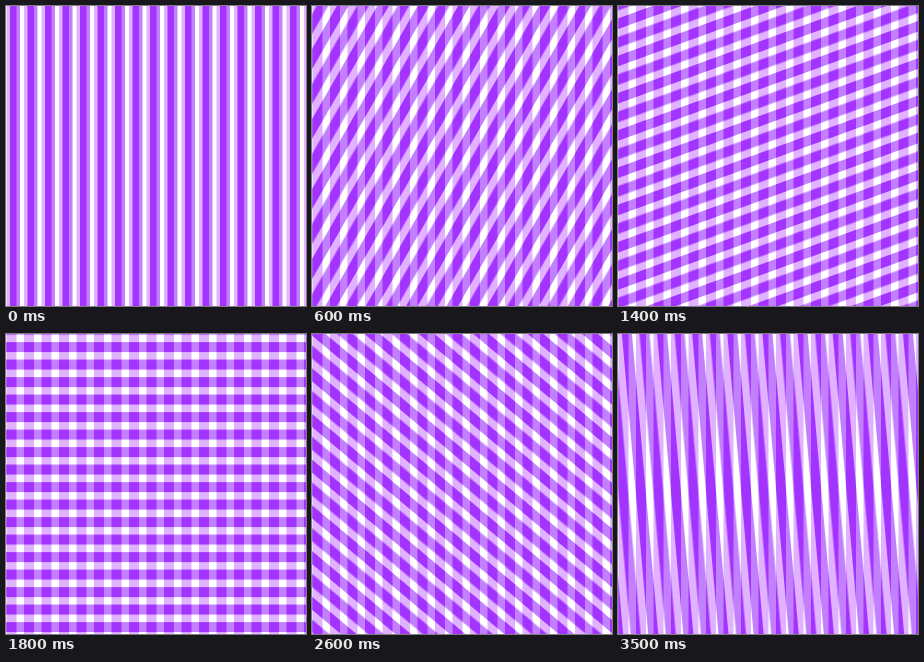
Animation of 300x300 px, one loop 3.6 s. Source, as an HTML page:

```html
<!DOCTYPE html>
<html lang="en">
<head>
<meta charset="utf-8">
<title>Crossing stripes</title>
<style>
  html, body {
    margin: 0;
    width: 100%;
    height: 100%;
    overflow: hidden;
    background: #fff;
  }
  svg {
    display: block;
    width: 100vw;
    height: 100vh;
    background: #fff;
    isolation: isolate;
  }
  /* Each dash of a very thick line is one stripe; difference subtracts its colour from white. */
  path {
    fill: none;
    stroke-width: 800;
    stroke-dasharray: 10 7.5;
    mix-blend-mode: difference;
  }
  .still { stroke: rgb(31, 77, 0); }
  .turning {
    stroke: rgb(61, 127, 0);
    transform-box: view-box;
    transform-origin: 137.9px 142px;
    animation: turn 3.6s steps(36) infinite;
  }
  @keyframes turn {
    from { transform: rotate(0deg); }
    to { transform: rotate(180deg); }
  }
</style>
</head>
<body>
<svg viewBox="0 0 300 300">
  <rect width="300" height="300" fill="#fff"/>
  <path class="still" d="M-17 150H320"/>
  <path class="turning" d="M-346 150H650"/>
</svg>
</body>
</html>
```
